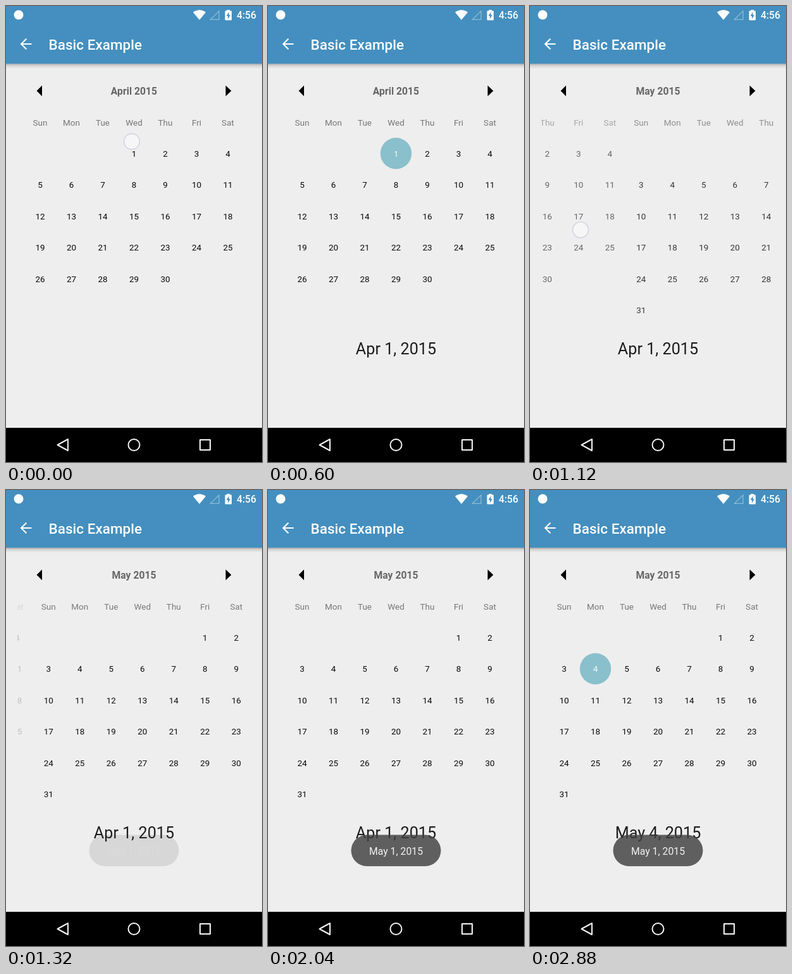
An HTML page with a canvas that plays this animation: 405 px wide and 720 px high, repeating every 2.92 s.

```html
<!DOCTYPE html>
<html lang="en">
<head>
<meta charset="utf-8">
<title>Basic Example</title>
<style>
  html, body { margin: 0; width: 100%; height: 100%; overflow: hidden; background: #eee; }
  canvas { display: block; width: 405px; height: 720px; }
</style>
</head>
<body>
<canvas id="stage"></canvas>
<script>
const W = 405, H = 720, LOOP = 2920;
const CELL = 49.5, LEFT = 54, TOP = 233, PAGE = 7 * CELL;
const FONT = 'Roboto, "Noto Sans", sans-serif';
const DAYS = ['Sun', 'Mon', 'Tue', 'Wed', 'Thu', 'Fri', 'Sat'];
const APRIL = { title: 'April 2015', first: 3, days: 30 };
const MAY = { title: 'May 2015', first: 5, days: 31 };

// Moments in ms
const PICK_1 = 80, DRAG = 840, RELEASE = 1080, TOAST = 1280, PICK_2 = 2260;
const SETTLE = 600, SLOP = 18, SWIPE = 191;

const canvas = document.getElementById('stage');
const ctx = canvas.getContext('2d');
const dpr = window.devicePixelRatio || 1;
canvas.width = W * dpr;
canvas.height = H * dpr;

const clamp = v => Math.max(0, Math.min(1, v));
const ramp = (t, start, length) => clamp((t - start) / length);

function text(str, x, y, size, color, weight = 400, align = 'center') {
  ctx.font = `${weight} ${size}px ${FONT}`;
  ctx.textAlign = align;
  ctx.fillStyle = color;
  ctx.fillText(str, x, y);
}

function shape(points, color) {
  ctx.beginPath();
  points.forEach(([x, y]) => ctx.lineTo(x, y));
  ctx.closePath();
  ctx.fillStyle = color;
  ctx.fill();
}

function disc(x, y, r, color) {
  ctx.beginPath();
  ctx.arc(x, y, r, 0, 2 * Math.PI);
  ctx.fillStyle = color;
  ctx.fill();
}

function statusBar() {
  disc(20, 14, 7.5, '#fff');

  // Wi-Fi fan
  ctx.beginPath();
  ctx.moveTo(306, 22);
  ctx.lineTo(296, 10);
  ctx.quadraticCurveTo(306, 2.5, 316, 10);
  ctx.closePath();
  ctx.fillStyle = '#fff';
  ctx.fill();

  // Empty signal triangle
  ctx.beginPath();
  ctx.moveTo(323.5, 21.3);
  ctx.lineTo(337, 21.3);
  ctx.lineTo(337, 8);
  ctx.closePath();
  ctx.lineWidth = 1.3;
  ctx.strokeStyle = 'rgba(255,255,255,.4)';
  ctx.stroke();

  // Charging battery
  ctx.fillStyle = '#fff';
  ctx.fillRect(349.5, 6, 4.5, 2.5);
  ctx.beginPath();
  ctx.roundRect(346.5, 7.5, 10.5, 15, 1.2);
  ctx.fill();
  shape([[352.6, 9.5], [348.6, 15.8], [351.2, 15.8], [351, 20.5], [355, 14.2], [352.5, 14.2]], '#448fbf');

  text('4:56', 396, 20.3, 15.75, '#fff', 500, 'right');
}

function header() {
  const shade = ctx.createLinearGradient(0, 91, 0, 99);
  shade.addColorStop(0, 'rgba(0,0,0,.3)');
  shade.addColorStop(.4, 'rgba(0,0,0,.1)');
  shade.addColorStop(1, 'rgba(0,0,0,0)');
  ctx.fillStyle = shade;
  ctx.fillRect(0, 91, W, 8);
  ctx.fillStyle = '#448fbf';
  ctx.fillRect(0, 0, W, 91);
  statusBar();

  // Back arrow
  ctx.beginPath();
  ctx.moveTo(40.5, 60);
  ctx.lineTo(24.5, 60);
  ctx.moveTo(32.3, 51.8);
  ctx.lineTo(24.1, 60);
  ctx.lineTo(32.3, 68.2);
  ctx.lineWidth = 2.2;
  ctx.strokeStyle = '#fff';
  ctx.stroke();

  text('Basic Example', 67.5, 69, 22.5, '#fff', 500, 'left');
}

function navBar() {
  ctx.fillStyle = '#000';
  ctx.fillRect(0, 666, W, 54);
  ctx.lineWidth = 2;
  ctx.strokeStyle = '#f4f4f4';
  ctx.lineJoin = 'round';
  ctx.beginPath();
  ctx.moveTo(81.5, 693);
  ctx.lineTo(98, 684);
  ctx.lineTo(98, 702);
  ctx.closePath();
  ctx.stroke();
  ctx.beginPath();
  ctx.arc(202.5, 693, 9, 0, 2 * Math.PI);
  ctx.stroke();
  ctx.strokeRect(307, 685, 16, 16);
  ctx.lineJoin = 'miter';
}

function page(month, shift, picked, pickAlpha) {
  const away = Math.abs(shift) / PAGE;
  if (away >= 1) return;
  const alpha = Math.sqrt(1 - away);
  ctx.save();
  ctx.beginPath();
  ctx.rect(18, 160, W - 36, 360);
  ctx.clip();
  ctx.translate(shift, 0);
  ctx.globalAlpha = alpha;
  DAYS.forEach((name, i) => text(name, LEFT + i * CELL, 188.7, 13.5, '#777'));
  for (let d = 1; d <= month.days; d++) {
    const slot = month.first + d - 1;
    const x = LEFT + (slot % 7) * CELL;
    const y = TOP + Math.floor(slot / 7) * CELL;
    const on = d === picked && pickAlpha > 0;
    if (on) {
      ctx.globalAlpha = alpha * pickAlpha;
      disc(x, y - .3, 24.7, '#8abfcc');
      ctx.globalAlpha = alpha;
    }
    text(d, x, y + 4.9, 13.5, on ? '#f4fafb' : '#0a0a0a');
  }
  ctx.restore();
}

function touch(x, y, alpha) {
  if (alpha <= 0) return;
  ctx.save();
  ctx.globalAlpha = alpha;
  disc(x, y, 13, 'rgba(252,252,254,.8)');
  ctx.lineWidth = 1.6;
  ctx.strokeStyle = 'rgba(196,192,210,.85)';
  ctx.beginPath();
  ctx.arc(x, y, 12.4, 0, 2 * Math.PI);
  ctx.stroke();
  ctx.restore();
}

function toast(t) {
  if (t < TOAST) return;
  const left = 1 - ramp(t, TOAST, 500);
  ctx.save();
  ctx.globalAlpha = 1 - left * left;
  ctx.beginPath();
  ctx.roundRect(131.5, 544.5, 142, 49.5, 24.7);
  ctx.fillStyle = 'rgba(64,64,64,.82)';
  ctx.fill();
  text('May 1, 2015', 202.5, 575.8, 15.8, '#f2f2f2');
  ctx.restore();
}

const dragged = t => SWIPE * Math.pow(ramp(t, DRAG, RELEASE - DRAG), 1.4);

function scrollAt(t) {
  const pulled = Math.max(0, dragged(t) - SLOP);
  const left = Math.pow(1 - ramp(t, RELEASE, SETTLE), 5);
  return t < RELEASE ? pulled : PAGE - (PAGE - pulled) * left;
}

function touches(t) {
  if (t < 300) touch(199, 214, .75 * (1 - ramp(t, 40, 160)));
  const swipe = ramp(t, 760, 40) * (1 - ramp(t, RELEASE, 160));
  touch(271 - dragged(t), 361 - dragged(t) * .04, swipe);
  touch(108, 273, ramp(t, 2140, 40) * (1 - ramp(t, 2240, 160)));
}

function draw(t) {
  ctx.setTransform(dpr, 0, 0, dpr, 0, 0);
  ctx.fillStyle = '#eee';
  ctx.fillRect(0, 0, W, H);
  header();

  const month = t < RELEASE ? APRIL : MAY;
  text(month.title, 202.5, 140, 15.75, '#666', 700);
  shape([[48.5, 134], [57, 125.5], [57, 142.5]], '#000');
  shape([[356.5, 134], [347.5, 125.5], [347.5, 142.5]], '#000');

  const scroll = scrollAt(t);
  page(APRIL, -scroll, 1, ramp(t, PICK_1, 80));
  page(MAY, PAGE - scroll, 4, ramp(t, PICK_2, 50));

  if (t >= PICK_1) {
    text(t < PICK_2 ? 'Apr 1, 2015' : 'May 4, 2015', 202.5, 549.8, 25.2, '#1c1c1c');
  }
  toast(t);
  navBar();
  touches(t);
}

const start = performance.now();
function tick() {
  draw((performance.now() - start) % LOOP);
  requestAnimationFrame(tick);
}
tick();
</script>
</body>
</html>
```
